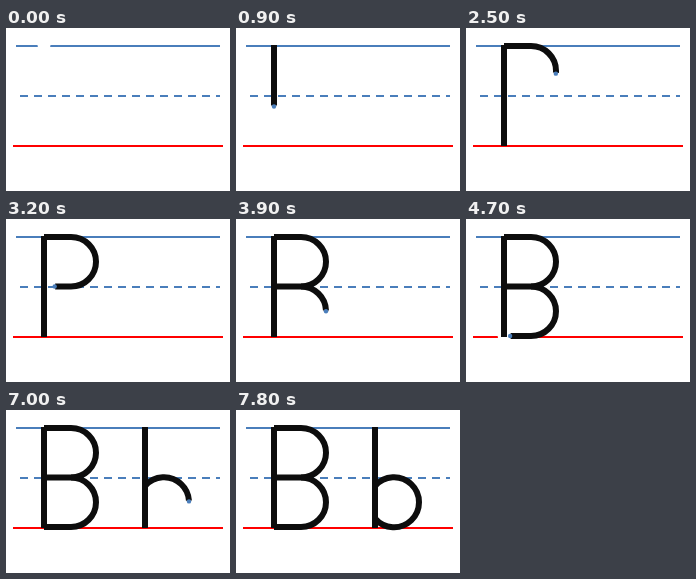
An HTML page with a canvas that plays this animation: 224x163 px, repeating every 7900 ms.

```html
<!DOCTYPE html>
<html lang="en">
<head>
<meta charset="utf-8">
<title>Writing B b</title>
<style>
html, body { margin: 0; width: 100%; height: 100%; overflow: hidden; background: #fff; }
canvas { display: block; }
</style>
</head>
<body>
<canvas id="stage" width="224" height="163"></canvas>
<script>
const ctx = document.getElementById('stage').getContext('2d');
const LOOP = 7900, STEP = 100;
const SPEED = 0.075;  // pen speed, px per ms
const LAG = 7;        // ink trails the pen by this much
const BLUE = '#4a7ebb', RED = '#ff0000', INK = '#0d0d0d';

const strokes = [
  [0, 'M38 17V118'],
  [1500, 'M38 18H65A25 24.75 0 0 1 65 67.5H38'],
  [3300, 'M65 67.5A25 24.75 0 0 1 65 117H38'],
  [4800, 'M139 17V118'],
  [6120, 'M139 76A25 25 0 1 1 139 108.5']
].map(([start, d]) => {
  const curve = document.createElementNS('http://www.w3.org/2000/svg', 'path');
  curve.setAttribute('d', d);
  return { start, curve, path: new Path2D(d), length: curve.getTotalLength() };
});

function rule(x1, x2, y, color, dash = []) {
  ctx.strokeStyle = color;
  ctx.lineWidth = 2;
  ctx.setLineDash(dash);
  ctx.beginPath();
  ctx.moveTo(x1, y);
  ctx.lineTo(x2, y);
  ctx.stroke();
}

function disc(p, r, color) {
  ctx.fillStyle = color;
  ctx.beginPath();
  ctx.arc(p.x, p.y, r, 0, Math.PI * 2);
  ctx.fill();
}

function draw(t) {
  ctx.fillStyle = '#fff';
  ctx.fillRect(0, 0, 224, 163);
  rule(10, 214, 18, BLUE);
  rule(7, 217, 118, RED);

  const active = strokes.find(s => t >= s.start && (t - s.start) * SPEED < s.length);
  const pen = active ? (t - active.start) * SPEED : 0;
  if (active) disc(active.curve.getPointAtLength(pen), 6.5, '#fff');
  rule(14, 214, 68, BLUE, [8, 6]);

  ctx.strokeStyle = INK;
  ctx.lineWidth = 6;
  for (const s of strokes) {
    if (t < s.start) continue;
    const ink = s === active ? pen - LAG : s.length;
    if (ink <= 0) continue;
    ctx.setLineDash(s === active ? [ink, 1000] : []);
    ctx.stroke(s.path);
  }
  if (active && pen > LAG) disc(active.curve.getPointAtLength(pen - LAG + 1), 2.2, BLUE);
}

const origin = performance.now();
function tick() {
  const t = (performance.now() - origin) % LOOP;
  draw(Math.floor(t / STEP) * STEP);
  requestAnimationFrame(tick);
}
tick();
</script>
</body>
</html>
```
